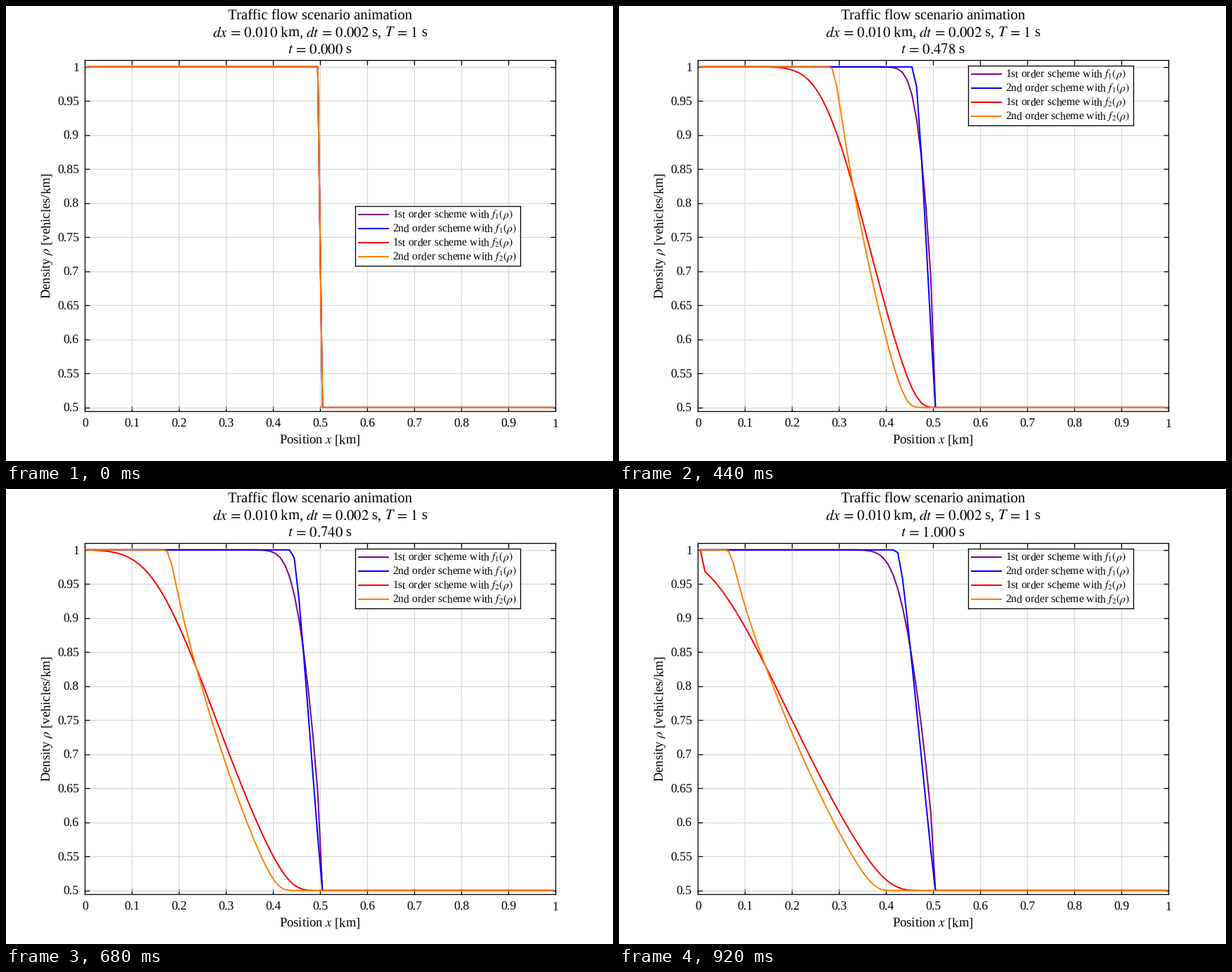
Recreate the animation shown at these times as a matplotlib script. Size 864 by 648 pixels, loop 0.96 s.

```python
import numpy as np
import matplotlib as mpl
import matplotlib.pyplot as plt
from matplotlib.animation import FuncAnimation

mpl.rcParams.update({
    "font.family": "Liberation Serif",
    "mathtext.fontset": "stix",
    "text.hinting": "none",
})

W, H, DPI = 864, 648, 72
FRAMES, INTERVAL = 24, 40
DX, DT, STEPS = 0.01, 0.002, 500
TITLE, LABEL, TICK, KEY = 20.7, 18.6, 17.8, 15.65


# --- traffic model: all waves travel left, so fluxes are taken from the right
def flux_1(rho):
    return rho * (1 - rho) / 15


def flux_2(rho):
    return -rho * np.log10(rho)


def limited_slope(rho):
    """Monotonized central slope in each cell."""
    d = np.diff(rho)
    a, b = d[:-1], d[1:]
    size = np.minimum(2 * np.minimum(abs(a), abs(b)), abs(a + b) / 2)
    slope = np.zeros_like(rho)
    slope[1:-1] = np.where(a * b > 0, np.sign(a) * size, 0)
    return slope


def solve(flux, order):
    """Explicit Euler in time; the end cells keep their density."""
    rho = np.where(x < 0.5, 1.0, 0.5)
    history = [rho]
    for _ in range(STEPS):
        left_face = rho if order == 1 else rho - limited_slope(rho) / 2
        g = flux(left_face)
        rho = rho.copy()
        rho[1:-1] += DT / DX * (g[1:-1] - g[2:])
        history.append(rho)
    return history


x = (np.arange(100) + 0.5) * DX
schemes = [
    (flux_1, 1, "#800080", r"1st order scheme with $f_1(\rho)$"),
    (flux_1, 2, "#0000ff", r"2nd order scheme with $f_1(\rho)$"),
    (flux_2, 1, "#ff0000", r"1st order scheme with $f_2(\rho)$"),
    (flux_2, 2, "#ff8000", r"2nd order scheme with $f_2(\rho)$"),
]


# --- layout in pixels, measured from the top left
def box(left, top, width, height):
    return [left / W, 1 - (top + height) / H, width / W, height / H]


def pixel_axes(left, top, width, height):
    axes = fig.add_axes(box(left, top, width, height))
    axes.set(xlim=(0, width), ylim=(height, 0), xticks=[], yticks=[])
    return axes


fig = plt.figure(figsize=(W / DPI, H / DPI), dpi=DPI, facecolor="white")

ax = fig.add_axes(box(112.3, 77, 669.6, 499.7))
ax.set(xlim=(0, 1), ylim=(0.495, 1.01))
ax.set_xticks(np.linspace(0, 1, 11))
ax.set_yticks(np.linspace(0.5, 1, 11))
ax.set_axisbelow(True)
ax.grid(color="#d9d9d9", linewidth=1.3)
ax.tick_params(direction="in", length=6.7, width=1.3, top=True, right=True,
               labelbottom=False, labelleft=False)
for spine in ax.spines.values():
    spine.set_linewidth(1.3)

page = pixel_axes(0, 0, W, H)
page.axis("off")


def write(px, py, text, size, ha="center", **kw):
    return page.text(px, py, text, fontsize=size, ha=ha, va="baseline", **kw)


for i in range(11):
    write(112.3 + 66.96 * i, 599.6, f"{i / 10:g}", TICK)
    write(104, 577.9 - 48.51 * i, f"{0.5 + i / 20:g}", TICK, ha="right")

write(447, 18.7, "Traffic flow scenario animation", TITLE)
write(447, 43.3, r"$dx\,=\,0.010$ km, $dt\,=\,0.002$ s, $T\,=\,1$ s", TITLE)
clock = write(447, 68, "", TITLE)
write(447, 623, "Position $x$ [km]", LABEL)
write(63.8, 327, r"Density $\rho$ [vehicles/km]", LABEL,
      rotation=90, rotation_mode="anchor")

KEY_W, KEY_H = 234.9, 84.5
key = pixel_axes(497, 85, KEY_W, KEY_H)
for spine in key.spines.values():
    spine.set_linewidth(1.3)

curves = []
for row, (flux, order, color, name) in enumerate(schemes):
    line, = ax.plot([], [], color=color, linewidth=2)
    curves.append((line, solve(flux, order)))
    mid = 12 + 19.85 * row
    key.plot([5, 47], [mid, mid], color=color, linewidth=2)
    key.text(52.5, mid + 5, name, fontsize=KEY, va="baseline")


def update(frame):
    step = round(STEPS * frame / (FRAMES - 1))
    for line, history in curves:
        line.set_data(x, history[step])
    clock.set_text(rf"$t\,=\,{step * DT:.3f}$ s")
    key.set_position(box(497, 85 if frame else 285, KEY_W, KEY_H))
    return []


anim = FuncAnimation(fig, update, frames=FRAMES, init_func=lambda: update(0),
                     interval=INTERVAL, repeat=True, repeat_delay=0, blit=False)
plt.show()
```
